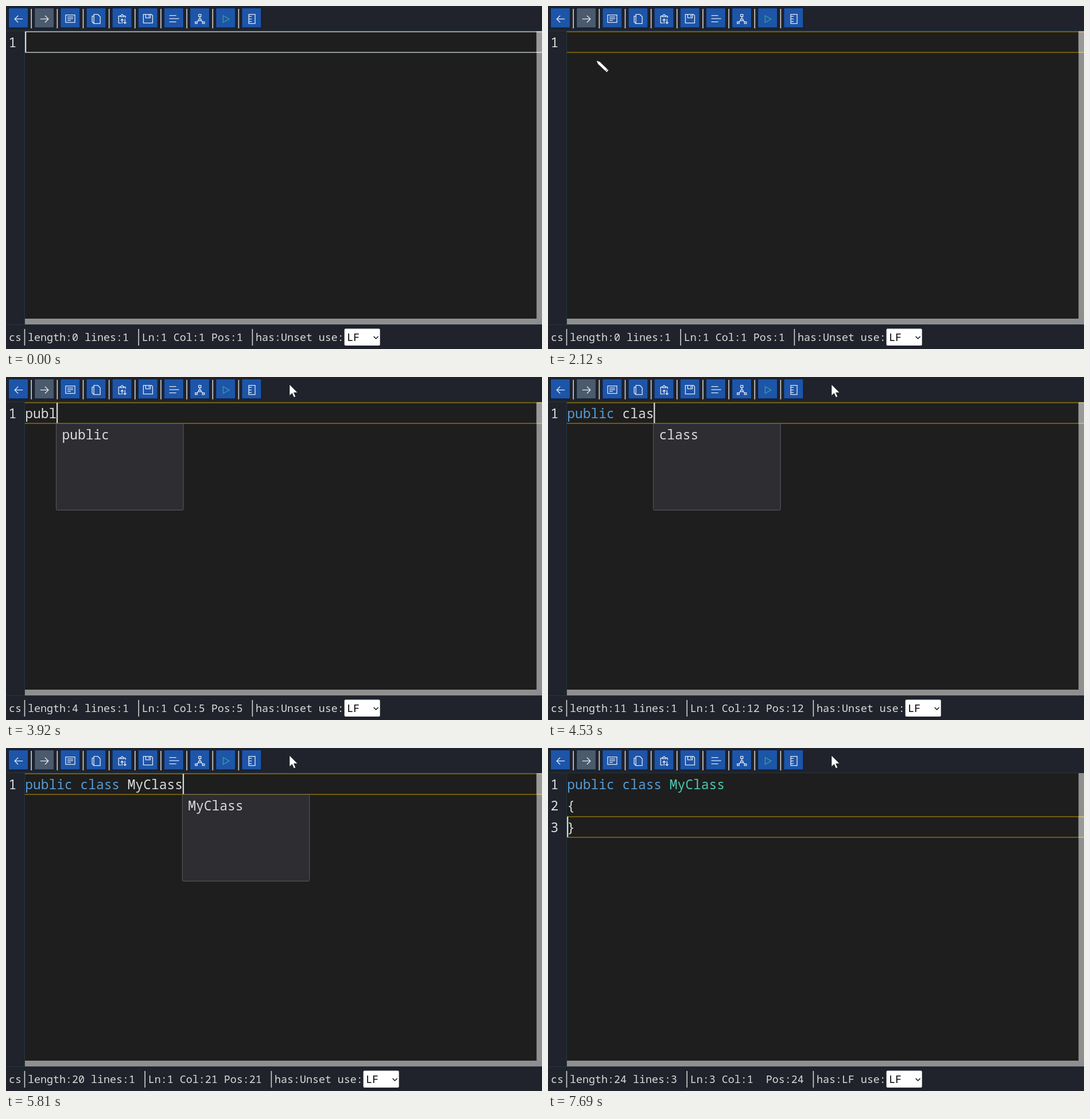
An HTML page that plays this animation: 934x599 px, repeating every 8000 ms.

```html
<!DOCTYPE html>
<html lang="en">
<head>
<meta charset="utf-8">
<title>Code editor</title>
<style>
html, body { margin: 0; width: 100%; height: 100%; overflow: hidden; background: #20232b; }
svg { display: block; width: 100%; height: 100%; }
text { font-family: "Noto Sans Mono", "DejaVu Sans Mono", monospace; white-space: pre; fill: #dcdcdc; }
.code text, .popup text { font-size: 22.9px; }
.status text { font-size: 18.33px; }
.icon { fill: none; stroke: #e4e9f2; stroke-width: 1.3; }
.sep { fill: #d2d2d2; }
</style>
</head>
<body>
<svg id="stage" viewBox="0 0 934 599" preserveAspectRatio="none">
  <rect width="934" height="599" fill="#20232b"/>
  <rect x="33" y="44" width="901" height="512" fill="#1e1e1e"/>
  <path d="M0 43.5H934M32.5 44V556M0 556.5H934" stroke="#24363e" fill="none"/>
  <g id="toolbar"></g>
  <rect x="924.5" y="44" width="9.5" height="502" fill="#8f8f8f"/>
  <rect x="33" y="546" width="901" height="10" fill="#8f8f8f"/>
  <rect x="924.5" y="546" width="9.5" height="10" fill="#8e8c93"/>
  <g id="row">
    <rect x="924.5" y="45" width="9.5" height="36" fill="#999"/>
    <path id="rowLine" d="M33 45H925M33 81H925" stroke-width="1.5"/>
    <path id="rowEnd" d="M924.5 45H934M924.5 81H934" stroke-width="1.5"/>
  </g>
  <g class="code" id="numbers"></g>
  <g class="code" id="code"></g>
  <rect id="caret" width="2.3" height="35.5" fill="#d6d6d6"/>
  <g class="popup" id="popup">
    <rect x=".5" y="81.5" width="221.5" height="151" rx="2" fill="#2d2d32" stroke="#5c5c61"/>
    <g id="hints"></g>
  </g>
  <g class="status">
    <text x="5" y="585">cs</text>
    <rect class="sep" x="31.7" y="564" width="1.6" height="29"/>
    <text id="size" x="38" y="585"></text>
    <g id="place">
      <rect class="sep" x="-6.3" y="564" width="1.6" height="29"/>
      <text y="585"></text>
    </g>
    <g id="ending">
      <rect class="sep" x="-6.3" y="564" width="1.6" height="29"/>
      <text y="585"></text>
    </g>
    <g id="select">
      <rect y="563.5" width="62" height="29.5" rx="2" fill="#fff"/>
      <text x="4.5" y="585" style="fill:#000">LF</text>
      <path d="M51 577l4 4 4-4" fill="none" stroke="#111" stroke-width="1.5"/>
    </g>
  </g>
  <g id="pen">
    <path d="M0 0L6.5 2.2L21.8 17.2L18.2 21L2.7 6.2Z" fill="#fff" stroke="#111" stroke-width=".8"/>
    <path d="M19.8 15.4L16.2 19.2" stroke="#222" stroke-width="1"/>
  </g>
  <path id="arrow" d="M0 0V19.5L4.5 15.4L7.7 22.6L10.7 21.3L7.6 14.2H14Z" fill="#fff" stroke="#111" stroke-width=".6"/>
</svg>
<script>
const LOOP = 8000, ADV = 13.74, LINE = 37.5, CELL = 11;
const NS = "http://www.w3.org/2000/svg";
const $ = id => document.getElementById(id);
const show = (node, on) => node.setAttribute("visibility", on ? "visible" : "hidden");
const move = (node, x, y) => node.setAttribute("transform", `translate(${x} ${y})`);

function add(parent, tag, attrs, text) {
  const node = document.createElementNS(NS, tag);
  for (const k in attrs) node.setAttribute(k, attrs[k]);
  if (text) node.textContent = text;
  return parent.appendChild(node);
}

// Icons, drawn around the centre of each button
const icons = [
  "M7.5 0H-6.5M-.5 -6L-6.5 0L-.5 6",
  "M-7 0H7M1 -6L7 0L1 6",
  "M-8 -7H8V6H-8ZM-5 -3.5H5M-5 -.5H5M-5 2.5H1",
  "M-4 -8H3L7 -4V8H-4ZM-4 -5H-7V5L-4 8",
  "M-2 7H-6V-5H-3M3 -5H6V-2M-3 -4V-6H-1.5Q0 -10 1.5 -6H3V-4ZM0 8V0M-2.5 2.5L0 0L2.5 2.5M5 0V8M2.5 5.5L5 8L7.5 5.5",
  "M-8 -8H6L8 -6V7H-8ZM-4 -8V-2H4V-8M1.5 -7V-4",
  "M-8 -6H4M-8 -.5H9M-8 5H4",
  "M-2 -8H2V-4H-2ZM0 -4V0M-2 0H2V3H-2ZM-2 2L-5 5M2 2L5 5M-8 5H-4.5V8H-8ZM4.5 5H8V8H4.5Z",
  "M-4.5 -6L6 0L-4.5 6Z",
  "M-5 -8H6V8H-5ZM-5 -4.5H0M-5 0H0M-5 4.5H0"
];
icons.forEach((d, i) => {
  const x = 4 + i * 45.15, bar = $("toolbar");
  add(bar, "rect", { x, y: 3, width: 35, height: 36, fill: "#0f1c33" });
  add(bar, "rect", { x: x + 1, y: 4, width: 33, height: 33.5, fill: i === 1 ? "#4b5a6c" : "#1d55a9" });
  const icon = add(bar, "path", { class: "icon", d, transform: `translate(${x + 17.7} 22.7)` });
  if (i === 8) icon.style.stroke = "#35a58f";
  if (i < 9) add(bar, "rect", { class: "sep", x: x + 39.4, y: 5, width: 1.6, height: 34 });
});

// Typing
const source = "public class MyClass\n{\n}";
const keys = [3510, 3710, 3850, 3920, 4050, 4120, 4220, 4290, 4400, 4470, 4530, 4670,
  4780, 5000, 5140, 5340, 5480, 5580, 5670, 5810, 6270, 6800, 6940, 7210];
const STEP_BACK = 7690;
const keywords = ["params", "partial", "private", "protected", "public", "case", "catch", "char", "class"];

function colourOf(word, lines) {
  if (word === "public" || word === "class") return "#569cd6";
  return word === "MyClass" && lines > 1 ? "#4ec9b0" : "#dcdcdc";
}

function drawText(text) {
  const lines = text.split("\n");
  $("code").textContent = $("numbers").textContent = "";
  lines.forEach((line, i) => {
    const y = 71.5 + i * LINE;
    add($("numbers"), "text", { x: 4.5, y }, String(i + 1));
    const row = add($("code"), "text", { x: 33.3, y });
    for (const part of line.match(/\S+|\s+/g) || [])
      add(row, "tspan", { style: "fill:" + colourOf(part, lines.length) }, part);
  });

  const word = lines.length === 1 && text.match(/\w+$/);
  show($("popup"), word);
  $("hints").textContent = "";
  if (!word) return;
  const found = keywords.filter(k => k.startsWith(word[0]));
  (found.length ? found : [word[0]]).slice(0, 4).forEach((hint, i) =>
    add($("hints"), "text", { x: 10.5, y: 109 + i * LINE }, hint));
  move($("popup"), 32 + text.length * ADV, 0);
}

function drawStatus(text, pos) {
  const before = text.slice(0, pos).split("\n");
  const lines = text.split("\n").length;
  const end = String(pos + 1);
  const col = String(before[before.length - 1].length + 1).padEnd(end.length);
  const size = `length:${text.length} lines:${lines}`;
  const place = `Ln:${before.length} Col:${col} Pos:${end}`;
  const ending = `has:${lines > 1 ? "LF" : "Unset"} use:`;
  const x1 = 38 + (size.length + 2) * CELL + .7;
  const x2 = x1 + (place.length + 2) * CELL + .2;
  $("size").textContent = size;
  $("place").lastElementChild.textContent = place;
  $("ending").lastElementChild.textContent = ending;
  move($("place"), x1, 0);
  move($("ending"), x2, 0);
  move($("select"), x2 + ending.length * CELL + .8, 0);
}

// Pointer path: start, end, from, to
const path = [
  [120, 880, [787, 539], [382, 183]],
  [1280, 2050, [382, 183], [84, 95]],
  [2120, 2840, [84, 95], [494, 13]]
];

function drawPointer(t) {
  let at = path[0][2];
  for (const [start, end, from, to] of path) {
    if (t < start) break;
    const p = Math.min(1, (t - start) / (end - start));
    const e = p * p * (3 - 2 * p);
    at = from.map((v, i) => v + (to[i] - v) * e);
  }
  const over = at[1] > 43;
  show($("pen"), t >= 120 && over);
  show($("arrow"), t >= 120 && !over);
  move(over ? $("pen") : $("arrow"), ...at);
}

const blend = (a, b, p) => `rgb(${a.map((v, i) => Math.round(v + (b[i] - v) * p))})`;

function caretOn(t) {
  if (t >= keys[0]) return true;
  if (t >= 1920) return Math.floor((t - 1920) / 530) % 2 === 1;
  return t < 430 || t >= 950;
}

let drawn = "";
function render(t) {
  const count = keys.filter(k => k <= t).length;
  const text = source.slice(0, count);
  const pos = count - (t >= STEP_BACK ? 1 : 0);
  if (drawn !== count + "/" + pos) {
    drawn = count + "/" + pos;
    drawText(text);
    drawStatus(text, pos);
  }
  const before = text.slice(0, pos).split("\n");
  const row = before.length - 1;
  move($("row"), 0, row * LINE);
  const focus = Math.max(0, Math.min(1, (t - 950) / 130));
  $("rowLine").setAttribute("stroke", blend([188, 200, 192], [142, 112, 10], focus));
  $("rowEnd").setAttribute("stroke", blend([226, 230, 226], [211, 190, 130], focus));
  $("caret").setAttribute("x", 33 + before[row].length * ADV);
  $("caret").setAttribute("y", 45 + row * LINE);
  show($("caret"), caretOn(t));
  drawPointer(t);
}

const begin = performance.now();
function tick() {
  render((performance.now() - begin) % LOOP);
  requestAnimationFrame(tick);
}
tick();
</script>
</body>
</html>
```
